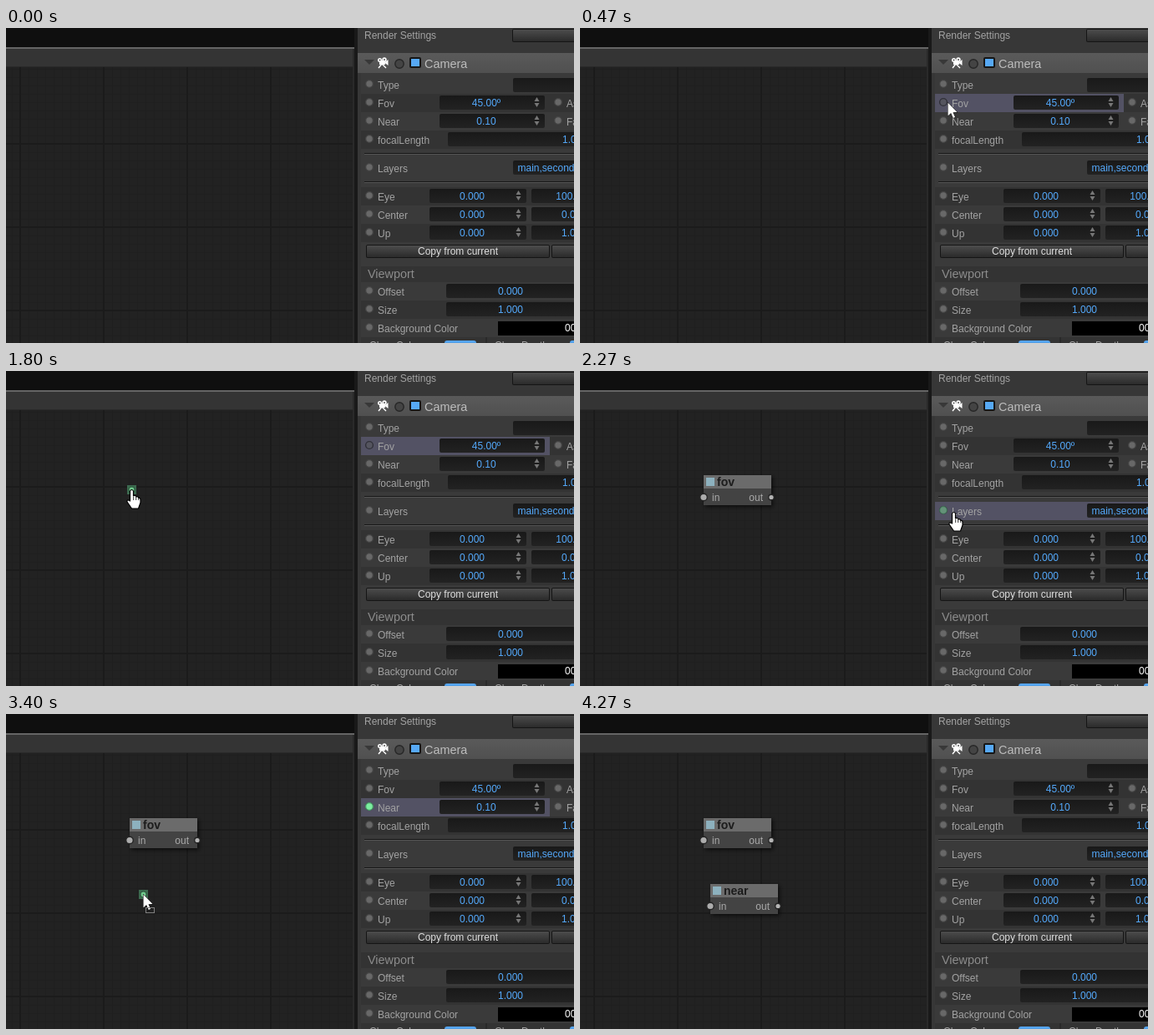
These frames come from a looping animation (680x378 px, 5270 ms). An HTML page with a canvas:

```html
<!DOCTYPE html>
<html lang="en">
<head>
<meta charset="utf-8">
<title>Node editor</title>
<style>
html, body { margin: 0; width: 100%; height: 100%; overflow: hidden; background: #222; }
canvas { display: block; }
</style>
</head>
<body>
<canvas id="stage" width="680" height="378"></canvas>
<script>
const ctx = document.getElementById('stage').getContext('2d', { alpha: false });
const LOOP = 5270, TICK = 1000 / 15;
const SANS = '"Liberation Sans", Arial, sans-serif';
const BLUE = '#54a9fb', LABEL = '#a3a3a3';

// Rows of the inspector: label, centre y, darker stripe, width
const rows = [
  ['Type', 68, 0], ['Fov', 90, 1, 226], ['Near', 112, 0, 226], ['focalLength', 134, 1],
  ['Layers', 168, 0], ['Eye', 202, 1], ['Center', 224, 0], ['Up', 246, 1],
  ['Offset', 316, 0], ['Size', 338, 1], ['Background Color', 360, 0],
].map(([name, y, dark, w = 255]) => ({ name, y, dark, w }));
const FOV = rows[1], NEAR = rows[2], LAYERS = rows[4];

// Pointer way points: tick, x, y
const path = [
  [1, 640, 356], [2, 588, 245], [3, 546, 168], [4, 521, 141], [5, 487, 115], [6, 456, 98],
  [7, 440, 89], [8, 434, 85], [12, 434, 85], [13, 435, 87], [16, 435, 87],
  [17, 425, 91], [18, 385, 102], [20, 258, 128], [22, 158, 142], [23, 151, 143], [24, 150, 142], [30, 150, 142],
  [31, 170, 144], [32, 290, 156], [33, 433, 167], [34, 447, 169], [35, 443, 166], [38, 437, 142],
  [42, 434, 112], [45, 434, 111],
  [46, 425, 114], [47, 384, 130], [49, 237, 190], [50, 184, 208], [51, 164, 216], [53, 161, 219], [56, 161, 219],
  [57, 156, 231], [59, 124, 290], [61, 80, 350], [63, 64, 369],
];

function pointer(i) {
  const k = path.findIndex(p => p[0] >= i);
  if (k < 0 || i < 1) return null;
  const b = path[k], a = path[k - 1] || b;
  const u = b === a ? 0 : (i - a[0]) / (b[0] - a[0]);
  return { x: Math.round(a[1] + (b[1] - a[1]) * u), y: Math.round(a[2] + (b[2] - a[2]) * u) };
}

const between = (i, a, b) => i >= a && i <= b;
const ramp = (i, a, n) => Math.max(0, Math.min(1, (i - a) / n));

function hoveredRow(i) {
  if (between(i, 9, 27)) return FOV;
  if (between(i, 43, 54)) return NEAR;
  const p = pointer(i - 1);   // hover trails the pointer by one tick
  return p && p.x > 424 && rows.find(r => p.y >= r.y - 11 && p.y < r.y + 11);
}

function glow(row, i) {
  if (row === FOV && i < 27) return ramp(i, 8, 3);
  if (row === NEAR && i < 54) return ramp(i, 40, 3);
  return row === LAYERS && i === 34 ? .4 : 0;
}

function rect(x, y, w, h, fill) {
  ctx.fillStyle = fill;
  ctx.fillRect(x, y, w, h);
}
function disc(x, y, r, fill, stroke) {
  ctx.beginPath();
  ctx.arc(x, y, r, 0, 7);
  ctx.fillStyle = fill;
  ctx.fill();
  if (stroke) { ctx.strokeStyle = stroke; ctx.lineWidth = 1.4; ctx.stroke(); }
}
function text(s, x, y, fill = LABEL, align = 'left', font = '12px ' + SANS) {
  ctx.font = font;
  ctx.textAlign = align;
  ctx.fillStyle = fill;
  ctx.fillText(s, x, y);
}
function poly(points, fill, stroke) {
  ctx.beginPath();
  points.forEach(([x, y]) => ctx.lineTo(x, y));
  ctx.closePath();
  if (stroke) { ctx.strokeStyle = stroke; ctx.lineWidth = 1; ctx.lineJoin = 'round'; ctx.stroke(); }
  ctx.fillStyle = fill;
  ctx.fill();
}
function box(x, y, w, h, r, top, bottom) {
  const g = ctx.createLinearGradient(0, y, 0, y + h);
  g.addColorStop(0, top);
  g.addColorStop(1, bottom);
  ctx.beginPath();
  ctx.roundRect(x, y, w, h, r);
  ctx.fillStyle = g;
  ctx.fill();
}

function field(x, y, w, value, spin) {
  box(x, y - 9, w, 17, 2, '#191919', '#222');
  if (value) text(value, x + (spin ? w / 2 - 7 : w / 2), y + 4, BLUE, 'center');
  if (!spin) return;
  const c = x + w - 9.5;
  poly([[c - 3, y - 2], [c, y - 7], [c + 3, y - 2]], '#777');
  poly([[c - 3, y], [c, y + 5], [c + 3, y]], '#777');
}
function button(x, y, w, label = '') {
  box(x, y, w, 16, 2, '#151515', '#151515');
  box(x + 1, y + 1, w - 2, 14, 1, '#4c4c4c', '#2b2b2b');
  text(label, x + w / 2, y + 12, '#dedede', 'center');
}

function drawGrid() {
  rect(0, 0, 418, 378, '#222');
  for (let x = 7; x < 416; x += 10) rect(x, 47, 1, 331, '#1f1f1f');
  for (let y = 49; y < 378; y += 10) rect(0, y, 416, 1, '#1f1f1f');
  for (let x = 16; x < 416; x += 100) rect(x, 47, 2, 331, '#1b1b1b');
  for (let y = 138; y < 378; y += 100) rect(0, y, 416, 2, '#1b1b1b');
  rect(0, 0, 418, 23, '#0f0f0f');
  rect(0, 23, 418, 2, '#656565');
  rect(0, 25, 418, 22, '#343434');
  rect(0, 46, 418, 1, '#292929');
  rect(415, 25, 2, 353, '#2a2a2a');
}

function drawHeader() {
  box(421, 30, 259, 24, 0, '#5a5a5a', '#505050');
  poly([[429, 38], [441, 38], [435, 44]], '#383838');
  disc(447.5, 38.5, 2.5, '#fff');
  disc(453, 38, 2.7, '#fff');
  rect(447, 39, 7, 5, '#fff');
  poly([[453, 41.5], [457.5, 38], [457.5, 45]], '#fff');
  ctx.strokeStyle = '#fff';
  ctx.lineWidth = 1.4;
  ctx.beginPath();
  ctx.moveTo(446, 48); ctx.lineTo(450, 43); ctx.lineTo(455, 48);
  ctx.stroke();
  disc(447.5, 38.5, 1, '#555');
  disc(453, 38, 1, '#555');
  disc(471, 43, 5.2, '#444', '#262626');
  box(483, 35, 14, 13, 2, '#161616', '#161616');
  rect(485, 37, 10, 9, '#57a9f5');
  text('Camera', 501, 48, '#bdbdbd', 'left', '14.4px ' + SANS);
}

function drawRow(row, i, hover) {
  const { name, y, w } = row, on = row === hover, g = glow(row, i);
  if (row.dark) rect(425, y - 11, 255, 22, '#333');
  if (on) rect(425, y - 11, w, 22, '#535264');
  disc(435, y - 1, 4.4, on ? '#55555f' : '#686868', on ? '#303038' : '#444');
  if (g) {
    ctx.globalAlpha = g;
    disc(435, y - 1, 4.4, '#7ceea0', '#4c9a68');
    ctx.globalAlpha = 1;
  }
  text(name, 445, y + 5);
}

function drawPanel(i) {
  rect(417, 0, 4, 378, '#191919');
  rect(421, 0, 259, 378, '#373737');
  rect(425, 54, 255, 324, '#3a3a3a');
  text('Render Settings', 429, 13);
  button(606, 1, 90);
  drawHeader();

  const hover = hoveredRow(i);
  rows.forEach(r => drawRow(r, i, hover));
  for (const y of [150, 184]) {
    rect(429, y, 251, 1, '#171717');
    rect(429, y + 1, 251, 1, '#555');
  }

  field(607, 69, 90);
  field(519, 90, 126, '45.00º', true);
  field(519, 112, 126, '0.10', true);
  field(529, 134, 304, '1.000');
  field(607, 168, 90);
  text('main,secondary', 612.5, 172, BLUE);
  [['0.000', '100.000'], ['0.000', '0.000'], ['0.000', '1.000']].forEach(([a, b], k) => {
    field(507, 202 + k * 22, 116, a, true);
    field(629, 202 + k * 22, 116, b, true);
  });
  [['Aspect', 90], ['Far', 112]].forEach(([s, y]) => {
    disc(661, y - 1, 4.4, '#686868', '#444');
    text(s, 671, y + 5);
  });
  button(431, 260, 220, 'Copy from current');
  button(653, 260, 90);

  rect(425, 286, 255, 19, '#333');
  text('Viewport', 433, 300, '#8c8c8c', 'left', '14.4px ' + SANS);
  field(527, 316, 154, '0.000');
  field(527, 338, 154, '1.000');
  rect(589, 352, 91, 17, '#000');
  text('000000', 669, 364, '#fff');

  rect(425, 371, 255, 7, '#333');
  rect(574, 371, 2, 7, '#292929');
  text('Clear Color', 435, 385);
  text('Clear Depth', 585, 385);
  box(525, 375, 38, 12, 3, '#58a8f2', '#3d86cc');
  box(675, 375, 38, 12, 3, '#58a8f2', '#3d86cc');
}

function drawNode(x, y, name) {
  ctx.save();
  ctx.shadowColor = 'rgba(0,0,0,.65)';
  ctx.shadowBlur = 5;
  ctx.shadowOffsetX = ctx.shadowOffsetY = 2;
  rect(x, y, 81, 36, '#434343');
  ctx.restore();
  rect(x, y, 81, 16, '#6b6b6b');
  rect(x + 3, y + 3, 10, 10, '#8db1be');
  text(name, x + 16, y + 13, '#1c1c1c', 'left', 'bold 14px ' + SANS);
  text('in', x + 10, y + 31, '#aaa');
  text('out', x + 71, y + 31, '#aaa', 'right');
  disc(x, y + 26.5, 4.3, '#acacac', '#242424');
  disc(x + 81, y + 26.5, 3.3, '#b5b5b5', '#242424');
}

function drawTooltip() {
  rect(433, 113, 137, 18, 'rgba(158,158,158,.88)');
  ctx.strokeStyle = '#777';
  ctx.lineWidth = 1;
  ctx.strokeRect(433.5, 113.5, 136, 17);
  text('Create keyframe for fov', 438.5, 126, '#454545', 'left', '11.4px "Open Sans", sans-serif');
}

function drawArrow(x, y) {
  const shape = [[0, 0], [0, 16], [3.6, 12.6], [6.2, 18.6], [8.6, 17.5], [6, 11.8], [11, 11.6]];
  poly(shape.map(([a, b]) => [x + a + .5, y + b + .5]), '#fff', '#000');
}

function drawHand(x, y) {
  ctx.save();
  ctx.translate(x, y);
  ctx.beginPath();
  ctx.moveTo(-1.5, 2);
  ctx.quadraticCurveTo(.5, -1, 2.5, 2);
  ctx.lineTo(2.5, 8);
  ctx.quadraticCurveTo(5, 6.5, 6, 9);
  ctx.quadraticCurveTo(8, 8, 9, 10.4);
  ctx.quadraticCurveTo(11, 10, 11, 12.5);
  ctx.lineTo(11, 16);
  ctx.lineTo(8.5, 23);
  ctx.lineTo(.5, 23);
  ctx.lineTo(-5, 15);
  ctx.quadraticCurveTo(-5.5, 11.5, -1.5, 14);
  ctx.closePath();
  ctx.fillStyle = '#fff';
  ctx.strokeStyle = '#000';
  ctx.lineWidth = 1.2;
  ctx.fill();
  ctx.stroke();
  ctx.beginPath();
  for (const a of [2.7, 5.7, 8.7]) { ctx.moveTo(a, 9); ctx.lineTo(a, 13); }
  ctx.lineWidth = .8;
  ctx.stroke();
  ctx.restore();
}

function drawPointer(i) {
  const p = pointer(i);
  if (!p) return;
  const { x, y } = p;
  const dragging = between(i, 17, 26) || between(i, 46, 53);
  const dropped = i === 27 || i === 54;
  const onDot = between(i, 8, 16) || between(i, 28, 30) || i === 34 || between(i, 41, 45) || between(i, 55, 56);
  if ((dragging || dropped) && x < 416) {
    rect(x - 5, y - 5, 11, 11, '#3d6a50');
    disc(x + .5, y + .5, 3.6, '#70c98c', '#2f5a40');
  }
  if (onDot || dropped) return drawHand(x, y);
  drawArrow(x, y);
  if (dragging) {
    ctx.strokeStyle = '#000';
    ctx.lineWidth = 1;
    ctx.strokeRect(x + 3.5, y + 16.5, 10, 6);
    ctx.setLineDash([1, 1]);
    ctx.strokeStyle = '#fff';
    ctx.strokeRect(x + 3.5, y + 16.5, 10, 6);
    ctx.setLineDash([]);
  }
}

function draw(i) {
  drawGrid();
  if (i >= 28) drawNode(148, 125, 'fov');
  if (i >= 55) drawNode(156, 204, 'near');
  drawPanel(i);
  if (i === 16) drawTooltip();
  drawPointer(i);
}

const start = performance.now();
function frame() {
  const t = (performance.now() - start) % LOOP;
  draw(Math.min(64, Math.floor((t + 3.4) / TICK)));
  requestAnimationFrame(frame);
}
frame();
</script>
</body>
</html>
```
